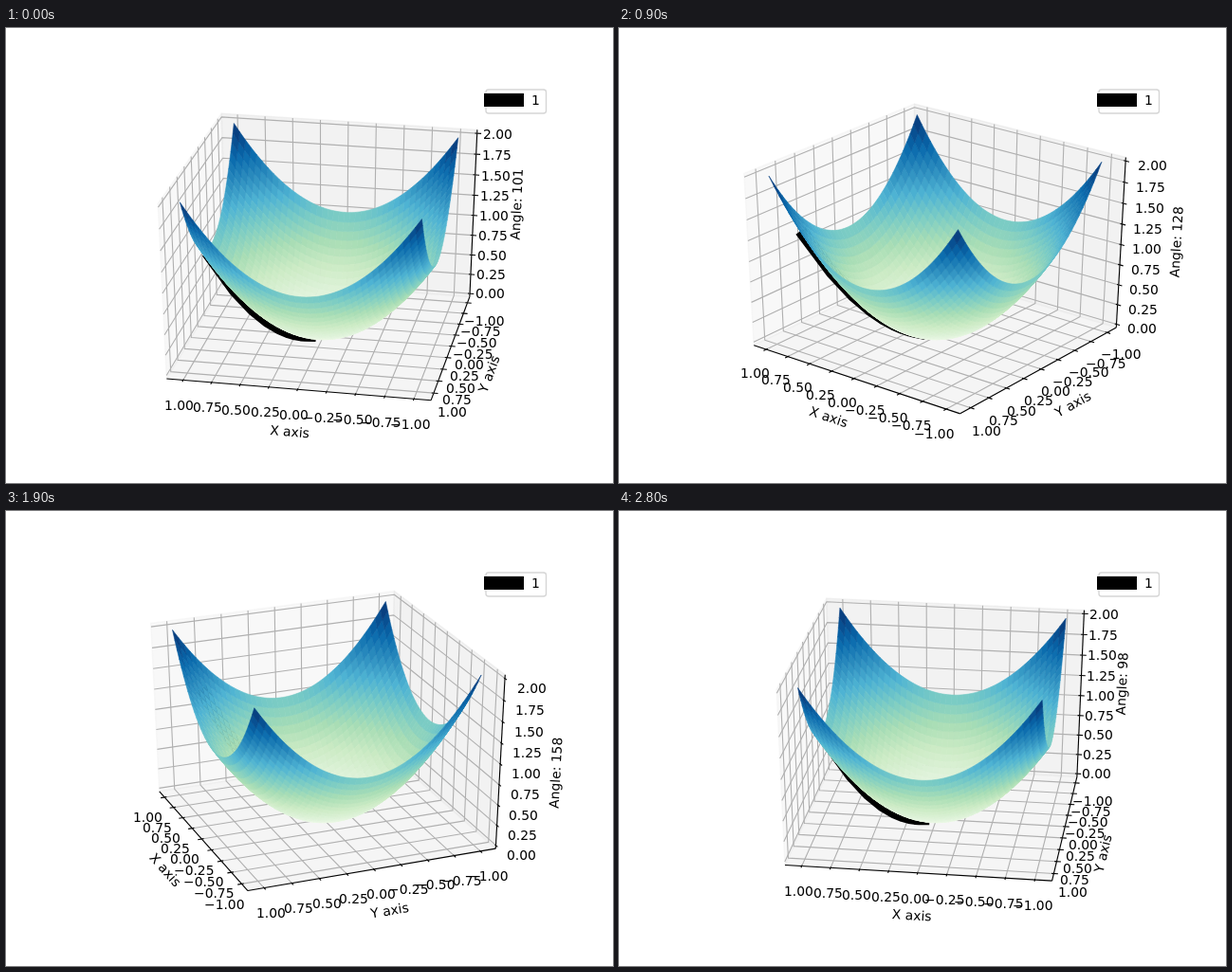
Recreate the animation shown at these times as an HTML page with a canvas. Size 640 by 480 pixels, loop 2900 ms.

```html
<!DOCTYPE html>
<html lang="en">
<head>
<meta charset="utf-8">
<title>Rotating surface</title>
<style>
html, body { margin: 0; width: 100%; height: 100%; overflow: hidden; background: #fff; }
canvas { display: block; width: 640px; height: 480px; }
</style>
</head>
<body>
<canvas id="plot" width="640" height="480"></canvas>
<script>
const ctx = document.getElementById('plot').getContext('2d');
const PT = 100 / 72;                 // pixels per point
const FONT = `${10 * PT}px "DejaVu Sans", sans-serif`;
const FRAMES = 29, STEP_MS = 100;
const CELLS = 40;
const EDGE = 0.5 + 1 / 48;           // box half size, limits scaled to -0.5..0.5
const TICK_PAD = 0.0738, LABEL_PAD = 0.1605;
const BACK = [1, -1, -1];            // signs of the far corner
const RAMP = ['f7fcf0', 'e0f3db', 'ccebc5', 'a8ddb5', '7bccc4', '4eb3d3', '2b8cbe', '0868ac', '084081']
  .map(h => [0, 2, 4].map(i => parseInt(h.slice(i, i + 2), 16)));

let cosA, sinA;
const cosE = Math.cos(Math.PI / 6), sinE = 0.5;

function project([x, y, z]) {
  const toward = x * cosA + y * sinA;
  const depth = 10 - toward * cosE - z * sinE;
  return [
    334.7 + (y * cosA - x * sinA) / depth * 496 / 0.185,
    237.4 - (z * cosE - toward * sinE) / depth * 369.6 / 0.185,
    depth
  ];
}

const scaled = (x, y, z) => [x / 2.2, y / 2.2, z / 2 - 0.5];
const bowl = (x, y) => scaled(x, y, x * x + y * y);

function ramp(v) {
  const f = Math.min(Math.max(v, 0), 1) * 8, i = Math.min(7, Math.floor(f));
  const c = RAMP[i].map((a, k) => Math.round(a + (RAMP[i + 1][k] - a) * (f - i)));
  return `rgb(${c})`;
}

function trace(points) {
  ctx.beginPath();
  for (const p of points) ctx.lineTo(p[0], p[1]);
}

function line(points, color, width) {
  trace(points.map(project));
  ctx.strokeStyle = color;
  ctx.lineWidth = width;
  ctx.stroke();
}

function pane(axis, grey) {
  const [u, v] = [0, 1, 2].filter(i => i !== axis);
  const corners = [[-1, -1], [1, -1], [1, 1], [-1, 1]].map(([a, b]) => {
    const p = [0, 0, 0];
    p[axis] = BACK[axis] * EDGE;
    p[u] = a * EDGE;
    p[v] = b * EDGE;
    return project(p);
  });
  trace(corners);
  ctx.closePath();
  ctx.fillStyle = ctx.strokeStyle = `rgba(${grey},${grey},${grey},0.5)`;
  ctx.lineWidth = PT;
  ctx.fill();
  ctx.stroke();
}

// Push a point away from the centre on every axis but one.
const pushOut = (p, axis, d) => p.map((c, i) => i === axis ? c : c + Math.sign(c) * d);

function tickText(text, x, y) {
  ctx.fillText(text, Math.round(x - ctx.measureText(text).width / 2), Math.round(y + 11));
}

function axisTitle(text, p, from, to) {
  const [x, y] = project(p), a = project(from), b = project(to);
  let turn = Math.atan2(b[1] - a[1], b[0] - a[0]);
  if (turn > Math.PI / 2) turn -= Math.PI;
  if (turn < -Math.PI / 2) turn += Math.PI;
  if (text[0] === 'A') turn = -Math.abs(turn);
  ctx.save();
  ctx.translate(x, y);
  ctx.rotate(turn);
  ctx.fillText(text, -ctx.measureText(text).width / 2, 4);
  ctx.restore();
}

function drawAxis(axis, title) {
  const side = axis === 0 ? 1 : 0;   // axis flipped to the outer edge
  const back = BACK.map(s => s * EDGE);
  const from = back.slice();
  from[side] *= -1;
  const to = from.slice();
  to[axis] *= -1;
  line([from, to], '#000', 0.8 * PT);

  const mid = from.slice();
  mid[axis] = 0;
  ctx.fillStyle = '#000';
  axisTitle(title, pushOut(mid, axis, LABEL_PAD), from, to);

  const ticks = Array.from({ length: 9 }, (_, i) => {
    const value = (axis === 2 ? 0 : -1) + i / 4;
    return { value, at: axis === 2 ? value / 2 - 0.5 : value / 2.2 };
  });
  for (const { at } of ticks) {
    const p0 = back.slice();
    p0[axis] = at;
    const p1 = p0.slice(), p2 = p0.slice();
    p1[(axis + 1) % 3] *= -1;
    p2[(axis + 2) % 3] *= -1;
    line([p1, p0, p2], '#b0b0b0', 0.8 * PT);
  }
  for (const { value, at } of ticks) {
    const p = from.slice();
    p[axis] = at;
    const inner = p.slice(), outer = p.slice(), out = Math.sign(p[side]) / 12;
    inner[side] -= 0.1 * out;
    outer[side] += 0.2 * out;
    line([inner, outer], '#000', 0.8 * PT);
    const [x, y] = project(pushOut(p, axis, TICK_PAD));
    tickText((value < 0 ? '\u2212' : '') + Math.abs(value).toFixed(2), x, y);
  }
}

// Steps of a descent that shrinks x and y by a fifth each time.
function drawDescent() {
  const path = Array.from({ length: 10 }, (_, i) => bowl(0.8 ** (i + 1), 0.8 ** (i + 1)));
  ctx.lineCap = 'square';
  line(path, '#000', 10 * PT);
  ctx.lineCap = 'butt';
}

function drawBowl() {
  const at = i => -1 + 2 * i / CELLS;
  const grid = [];
  for (let i = 0; i <= CELLS; i++) {
    grid.push([]);
    for (let j = 0; j <= CELLS; j++) grid[i].push(project(bowl(at(i), at(j))));
  }
  const cells = [];
  for (let i = 0; i < CELLS; i++) {
    for (let j = 0; j < CELLS; j++) {
      const quad = [grid[i][j], grid[i + 1][j], grid[i + 1][j + 1], grid[i][j + 1]];
      const mean = (at(i) ** 2 + at(i + 1) ** 2 + at(j) ** 2 + at(j + 1) ** 2) / 2;
      cells.push({ quad, color: ramp(mean / 1.9), depth: quad.reduce((s, p) => s + p[2], 0) });
    }
  }
  cells.sort((a, b) => b.depth - a.depth);
  ctx.lineWidth = 0.6;
  for (const { quad, color } of cells) {
    trace(quad);
    ctx.closePath();
    ctx.fillStyle = ctx.strokeStyle = color;
    ctx.fill();
    ctx.stroke();
  }
}

function drawLegend() {
  ctx.beginPath();
  ctx.roundRect(506, 65, 63.5, 25, 2.8);
  ctx.fillStyle = 'rgba(255,255,255,0.8)';
  ctx.strokeStyle = 'rgba(204,204,204,0.8)';
  ctx.lineWidth = PT;
  ctx.fill();
  ctx.stroke();
  ctx.fillStyle = '#000';
  ctx.fillRect(504, 69, 42, 14);
  ctx.fillText('1', 554, 81);
}

function draw(frame) {
  const angle = 95 + 3 * ((frame + 2) % FRAMES);
  cosA = Math.cos(angle * Math.PI / 180);
  sinA = Math.sin(angle * Math.PI / 180);
  ctx.fillStyle = '#fff';
  ctx.fillRect(0, 0, 640, 480);
  ctx.font = FONT;
  ctx.lineJoin = 'round';
  pane(0, 242);
  pane(1, 230);
  pane(2, 236);
  drawAxis(0, 'X axis');
  drawAxis(1, 'Y axis');
  drawAxis(2, 'Angle: ' + angle);
  drawDescent();
  drawBowl();
  drawLegend();
}

let shown = -1;
function tick() {
  const frame = Math.floor(performance.now() / STEP_MS) % FRAMES;
  if (frame !== shown) draw(shown = frame);
  requestAnimationFrame(tick);
}
tick();
</script>
</body>
</html>
```
